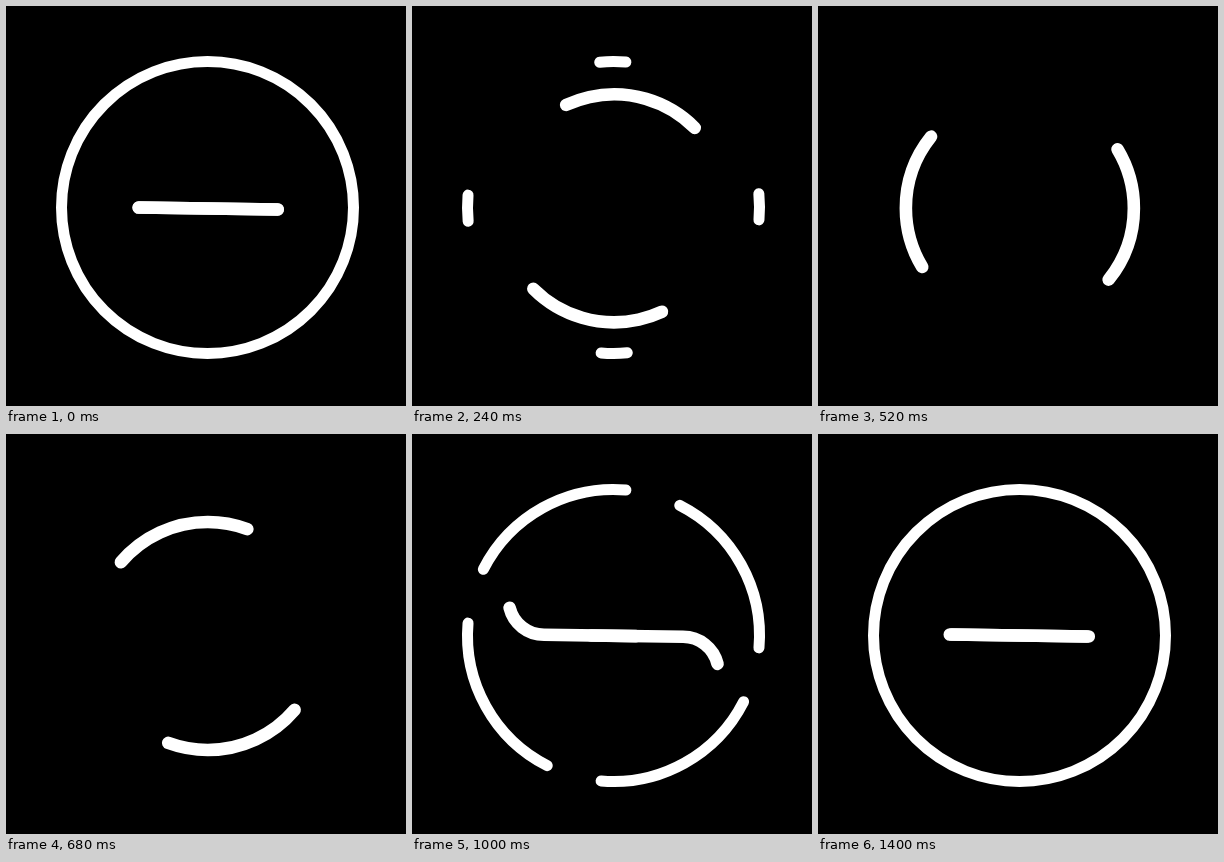
These frames come from a looping animation (400 by 400 pixels, 1.52 s). An HTML page:

```html
<!DOCTYPE html>
<html lang="en">
<head>
<meta charset="utf-8">
<title>Loop</title>
<style>
  html, body { margin: 0; width: 100%; height: 100%; overflow: hidden; background: #000; }
  svg { display: block; width: 100vw; height: 100vh; }
  .stroke { fill: none; stroke: #fff; stroke-linecap: round; }
  #ring { stroke-width: 11; }
  #inner { stroke-width: 12.6; }
</style>
</head>
<body>
<svg viewBox="0 0 400 400">
  <circle id="ring" class="stroke" r="146" pathLength="360"/>
  <g id="inner" class="stroke">
    <path id="track" d="M-69.5-1L72 1A34.6 34.6 0 0 0 103.3-48.2
      A114 114 0 0 0-114 0A114 114 0 0 0 114 0
      A114 114 0 0 0-114 0A114 114 0 0 0 114 0
      A114 114 0 0 0-114 0A114 114 0 0 0 100.9 53
      A35.5 35.5 0 0 0 69.5 1L-69.5-1"/>
    <use href="#track" transform="rotate(180)"/>
  </g>
</svg>
<script>
const LOOP = 1520, STEP = 40, LAST = 1400, DASH = 139;
const ring = document.getElementById('ring');
const inner = document.getElementById('inner');

// Time (ms) and distance the dash has travelled along its track.
const keys = [[0, 0], [160, 105], [260, 296], [360, 574], [520, 1157],
              [680, 1730.5], [840, 2083], [1000, 2278], [1120, 2323.5], [1400, 2327]];

const slope = i => (keys[i + 1][1] - keys[i][1]) / (keys[i + 1][0] - keys[i][0]);

// Harmonic mean of neighbouring slopes keeps the curve monotone.
const tangents = keys.map((_, i) => {
  if (i === 0 || i === keys.length - 1) return 0;
  const a = slope(i - 1), b = slope(i);
  return 2 * a * b / (a + b);
});

function travel(t) {
  let i = 0;
  while (i < keys.length - 2 && t >= keys[i + 1][0]) i++;
  const [t0, d0] = keys[i], [t1, d1] = keys[i + 1];
  const h = t1 - t0, p = (t - t0) / h, q = 1 - p;
  return d0 * q * q * (1 + 2 * p) + d1 * p * p * (3 - 2 * p)
       + h * p * q * (tangents[i] * q - tangents[i + 1] * p);
}

function smooth(x) {
  x = Math.min(1, Math.max(0, x));
  return x * x * (3 - 2 * x);
}

function drawRing(t) {
  const closing = t > 560;
  const gap = 90 * smooth(closing ? (1105 - t) / 325 : t / 304);
  const span = 90 - gap;
  const head = closing ? span - 0.22 * gap : 90 + 0.068 * gap;
  ring.style.display = span > 0.01 ? '' : 'none';
  ring.setAttribute('stroke-dasharray', gap > 0 ? `${span} ${gap}` : 'none');
  ring.setAttribute('transform', `translate(201.5 201.5) rotate(${-head})`);
}

function drawInner(t) {
  const p = t / LAST;
  inner.setAttribute('transform', `translate(${202.2 - 0.9 * p} ${202.5 - p})`);
  inner.setAttribute('stroke-dasharray', `${DASH} 9999`);
  inner.setAttribute('stroke-dashoffset', -travel(t));
}

function frame() {
  const t = Math.min(LAST, Math.floor(performance.now() % LOOP / STEP) * STEP);
  drawRing(t);
  drawInner(t);
  requestAnimationFrame(frame);
}
frame();
</script>
</body>
</html>
```
